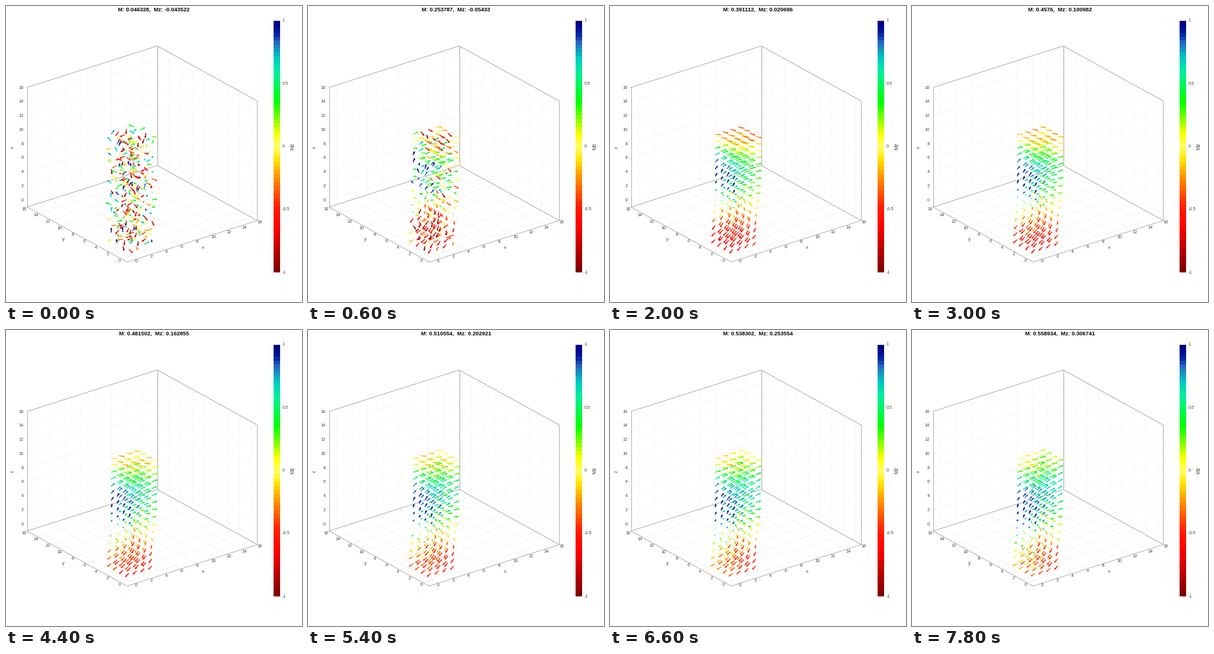
A matplotlib script for the animation above (8 s loop, 500 by 500 pixels).

```python
import numpy as np
import matplotlib.pyplot as plt
from matplotlib.animation import FuncAnimation
from matplotlib.colors import LinearSegmentedColormap

SIZE, DPI, STEP, COUNT = 500, 100, 200, 40
PT = 72 / DPI
DARK, EDGE, GRID = "#404040", "#989898", "#f0f0f0"
HOLDS = {9, 16, 17, 18, 24, 25, 36, 37, 38}

# Screen steps of one unit along x, y and z
AXES = np.array([[12.94, -4.12], [-9.94, -5.47], [0, -11.88]])
CORNER = np.array([204.5, 432.5])
ARROW = 0.66

plt.rcParams["font.family"] = "Liberation Sans"

CMAP = LinearSegmentedColormap.from_list("spin", [
    (0, "#800000"), (.18, "#ff0000"), (.26, "#ff2000"), (.37, "#ff8c00"),
    (.45, "#ffe800"), (.5, "#ffff70"), (.55, "#ffff00"), (.68, "#00ff00"),
    (.8, "#00f0a0"), (.86, "#00c8c0"), (.92, "#2868c0"), (.96, "#0018a0"),
    (1, "#000080")], N=64)

# Magnetisation (total and along z) at a few steps
KEY_STEPS = [0, 3, 10, 15, 22, 30, 39]
M_ABS = [.046328, .253787, .391112, .4576, .481502, .527986, .558934]
M_Z = [-.043522, -.05433, .020696, .100982, .162855, .226961, .306741]


def project(p):
    return CORNER + (np.asarray(p, float) + 1) @ AXES


def unit(v):
    return v / np.linalg.norm(v, axis=-1, keepdims=True)


sites = np.array([(x, y, z) for x in (3, 2, 1, 0) for y in (3, 2, 1, 0)
                  for z in range(16)])
base_noise = unit(np.random.default_rng(7).normal(size=sites.shape))


def helix(mix):
    """Spiral of spins; mix runs from 0 to 1 as the column relaxes."""
    x, _, z = sites.T
    crest = 9.3 - 1.3 * mix + .8 * x * mix
    wave = np.cos(2 * np.pi * (z - crest) / (17 + 3 * mix))
    mean = .15 + .15 * mix - .08 * x
    swing = .8 - .15 * mix - .12 * x * (1 - .75 * mix)
    up = np.clip(mean + swing * wave, -.98, .98)
    s = np.clip((z + .5 * x) / 13, 0, 1)
    turn = np.radians(183 + (140 + 10 * mix) * s * s * (3 - 2 * s))
    flat = np.sqrt(1 - up ** 2)
    return np.column_stack([flat * np.cos(turn), flat * np.sin(turn), up])


def spins(k, mz):
    mix = (mz - M_Z[2]) / (M_Z[-1] - M_Z[2])
    heat = .08 + 30 * np.exp(-1.35 * k)
    jitter = np.random.default_rng(100 + k).normal(size=sites.shape)
    return unit(helix(mix) + heat * (base_noise + .3 * jitter))


fig = plt.figure(figsize=(SIZE / DPI, SIZE / DPI), dpi=DPI, facecolor="white")
ax = fig.add_axes([0, 0, 1, 1])
ax.axis("off")


def path(points, color, width):
    p = project(points)
    ax.plot(p[:, 0], p[:, 1], color=color, lw=width * PT, zorder=1)


def label(x, y, text, size=7.4, ha="center", **kw):
    kw = {"color": DARK, "va": "center", **kw}
    return ax.text(x, y, text, fontsize=size * PT, ha=ha, **kw)


# Grid on the floor and the two back walls, with tick labels
for t in range(0, 17, 2):
    path([(t, -1, -1), (t, 16, -1), (t, 16, 16)], GRID, .6)
    path([(-1, t, -1), (16, t, -1), (16, t, 16)], GRID, .6)
    path([(-1, 16, t), (16, 16, t), (16, -1, t)], GRID, .6)
    px, py = project((t, -1, -1))
    label(px, py + 3.5, t, ha="left")
    px, py = project((-1, t, -1))
    label(px - .5, py + 3.5, t, ha="right")
    label(30, project((-1, 16, t))[1] + .5, t, ha="right")

# Box edges
for h in (-1, 16):
    path([(-1, 16, h), (16, 16, h), (16, -1, h)], EDGE, .8)
for x, y in ((-1, 16), (16, 16), (16, -1)):
    path([(x, y, -1), (x, y, 16)], EDGE, .8)
path([(-1, 16, -1), (-1, -1, -1), (16, -1, -1)], EDGE, .8)

label(333, 408, "x", 8)
label(97, 395, "y", 8)
label(11, 239, "z", 8, rotation=90)

# Colour bar
ax.imshow(np.linspace(1, -1, 128)[:, None], cmap=CMAP, vmin=-1, vmax=1,
          extent=(452, 463, 450, 25), aspect="auto", interpolation="nearest")
for value in (1, .5, 0, -.5, -1):
    label(466.5, 237.5 - 212.5 * value, f"{value:g}", ha="left")
label(484, 237, "Mz", 9, rotation=90)

ax.set_xlim(0, SIZE)
ax.set_ylim(SIZE, 0)

title = label(250, 6, "", 9.35, weight="bold", color="black")

tails = project(sites)
still = np.zeros(len(sites))
arrows = ax.quiver(tails[:, 0], tails[:, 1], still + 1, still, still,
                   cmap=CMAP, clim=(-1, 1), angles="xy", scale_units="xy",
                   scale=1, units="dots", width=1.5, headwidth=2.4,
                   headlength=2.6, headaxislength=2.6, minlength=.5, zorder=3)


def draw(k):
    while k in HOLDS:
        k -= 1
    m, mz = (np.interp(k, KEY_STEPS, row) for row in (M_ABS, M_Z))
    title.set_text(f"M: {round(m, 6):g},  Mz: {round(mz, 6):g}")
    s = spins(k, mz)
    d = s @ AXES * ARROW
    arrows.set_UVC(d[:, 0], d[:, 1], s[:, 2])
    return arrows, title


anim = FuncAnimation(fig, draw, frames=COUNT, interval=STEP, repeat=True,
                     repeat_delay=0)
plt.show()
```
